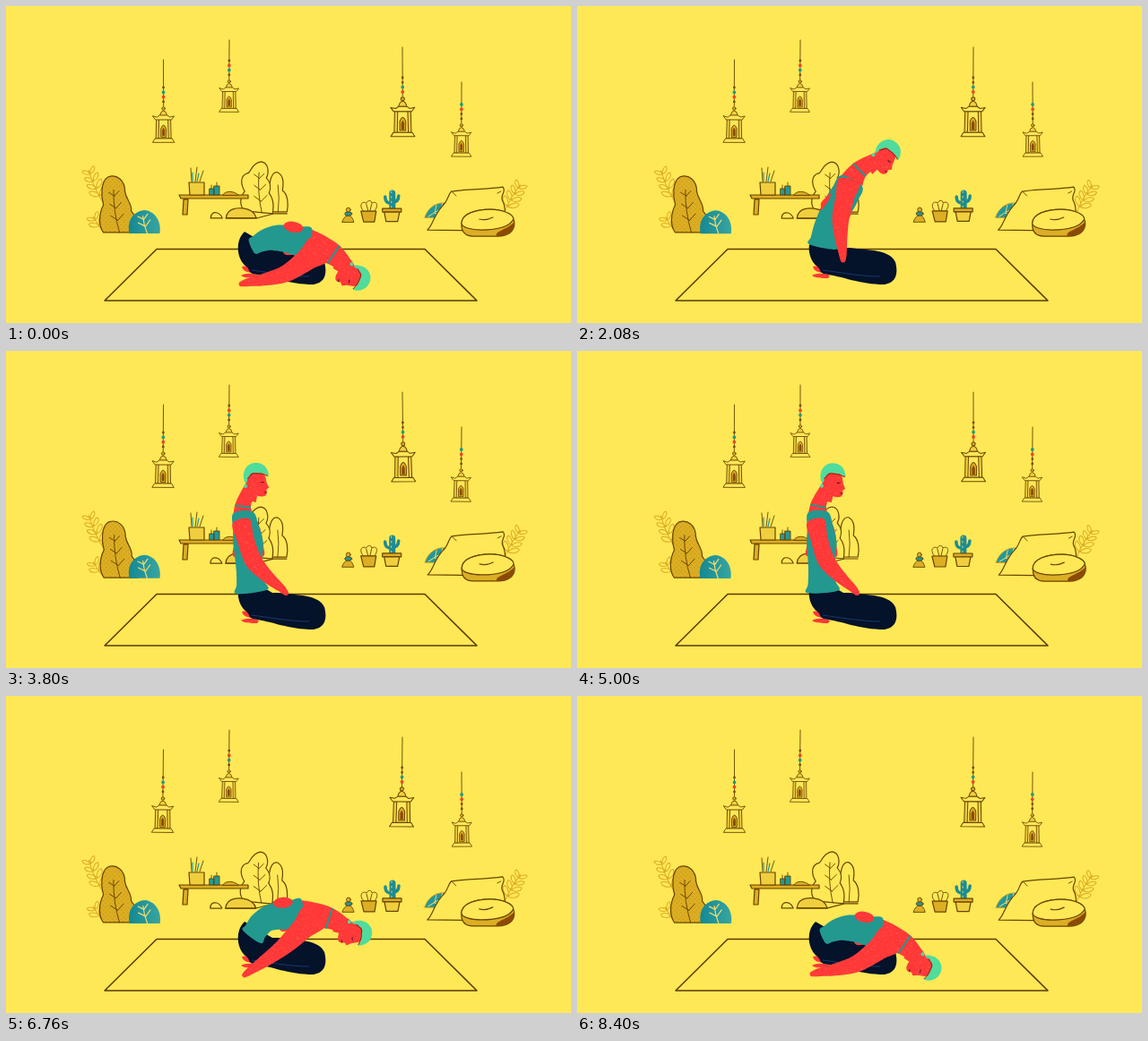
Write an HTML page that moves like this. It is 630 px wide and 354 px high and loops after 8480 ms.

```html
<!DOCTYPE html>
<html lang="en">
<head>
<meta charset="utf-8">
<title>Yoga room</title>
<style>
  html, body { margin: 0; width: 100%; height: 100%; overflow: hidden; background: #ffe856; }
  svg { display: block; width: 100vw; height: 100vh; }
  .line { fill: none; stroke: #684400; stroke-width: 1.2; stroke-linecap: round; stroke-linejoin: round; }
  .mat { stroke: #5a3a00; stroke-width: 1.5; }
  .paper { fill: #ffe856; }
  .gold { fill: #dcae24; }
  .light { fill: #f0cf3e; }
  .dark { fill: #8c4a04; stroke: none; }
  .teal { fill: #23989a; }
  .thin { stroke-width: .9; }
  .fern { stroke: #dcab22; stroke-width: 1; }
  .vein { stroke: #f2dc72; }
  .plain { stroke: none; }
  .skin { fill: #ff3838; }
  .grain { fill: url(#grain); }
  .top { fill: #23988f; }
</style>
</head>
<body>
<svg viewBox="0 0 630 354" preserveAspectRatio="xMidYMid meet">
  <defs>
    <pattern id="speckGold" width="5" height="5" patternUnits="userSpaceOnUse">
      <rect width="5" height="5" fill="#dcae22"/>
      <path d="M1 1h1v1h-1zM3.5 3.5h1v1h-1z" fill="#b98a14"/>
    </pattern>
    <pattern id="grain" width="40" height="40" patternUnits="userSpaceOnUse"></pattern>
    <linearGradient id="bush">
      <stop offset="0" stop-color="#148894"/>
      <stop offset="1" stop-color="#38a5a0"/>
    </linearGradient>
  </defs>

  <g class="line">
    <path class="mat" d="M168 271.5H467L525 329H110Z"/>

    <g id="ferns" class="fern boil" data-amp="1"></g>

    <g class="boil" data-amp=".6">
      <path fill="url(#speckGold)" d="M109 253C103 245 104 232 109 222C106 212 106 196 114 191C124 187 133 195 133 207C134 216 141 220 140 229C146 236 149 245 147 253Z"/>
      <g class="thin" data-veins="127 253 48 -8 3"></g>
    </g>
    <g class="boil" data-amp=".6">
      <path class="plain" fill="url(#bush)" d="M138 254C135 239 143 229 155 228C167 229 174 241 172 254Z"/>
      <g class="vein" data-veins="158 254 20 -14 2"></g>
    </g>

    <g class="boil" data-amp=".3">
      <path class="paper" d="M295 230C291 208 293 183 303 186C310 190 309 199 308 206C314 210 315 222 313 230Z"/>
      <path class="paper" d="M266 229C259 222 261 213 266 207C261 199 261 190 268 187C273 188 272 176 284 174C293 175 293 187 290 192C297 200 294 206 293 209C299 217 298 225 297 232Z"/>
      <g class="thin" data-veins="285 231 45 -4 3"></g>
      <path class="thin" d="M303 200Q305 215 303 230"/>
      <path class="light" d="M245 237C246 227 254 225 264 226C272 227 277 230 279 237Z"/>
      <path class="paper" d="M228 237C228 232 231 230 235 231C239 232 240 235 241 237Z"/>
      <path d="M245 237H279L298 232H313"/>
    </g>
    <g>
      <path class="gold" d="M198 216L197 233H202L203 216ZM193 211H270V215H195Z"/>
      <path class="light" d="M204 197H221V211H205Z"/>
      <path class="thin" d="M207 196L206 181M211 196L213 180M216 196L220 184"/>
      <path stroke="#23989a" d="M208 196V186M213 196L215 187"/>
      <path class="teal thin" d="M227 204H232V211H227ZM232 201H238V211H232Z"/>
      <path class="thin" d="M229 204V200M235 201V197"/>
      <path class="gold thin" d="M242 211C244 206 254 206 259 211Z"/>
    </g>

    <g class="boil" data-amp=".3">
      <path class="gold thin" d="M375 241C377 235 380 234 382 234C385 234 387 237 388 241Z"/>
      <ellipse class="teal thin" cx="382" cy="232" rx="4" ry="2.3"/>
      <circle class="gold thin" cx="382" cy="227.500" r="2.400"/>
      <path class="paper thin" d="M399 229C393 223 397 217 402 220C404 216 408 217 408 220C414 217 416 223 411 229Z"/>
      <path class="thin" d="M402 221L404 229M408 221L406 229"/>
      <path class="gold" d="M396 229H413L411 241H399Z"/>
      <g fill="none" stroke="#1d8c92">
        <path stroke-width="7" d="M431 225V209"/>
        <path stroke-width="3.500" d="M431 220Q423 221 423 213M431 219Q438 219 438 212"/>
      </g>
      <path class="vein thin" stroke-dasharray="1.500 4" d="M430 207V225"/>
      <path class="gold" d="M420 226H441V230H420Z"/>
      <path class="light" d="M422 230H439L437 240.500H424Z"/>
    </g>

    <g class="boil" data-amp=".3">
      <path class="teal thin" stroke="#c99620" d="M467 236C471 224 482 217 495 221L490 236Z"/>
      <g class="vein thin" data-veins="471 235 20 62 2"></g>
      <path class="paper" d="M470 250C476 245 476 236 486 224C494 217 493 209 497 207C515 204 535 205 554 202C559 207 550 211 554 218C558 225 555 232 558 240L545 251Z"/>
      <path class="thin" d="M497 207L502 212M552 207L548 209"/>
      <path class="gold" d="M508 244C507 232 524 227 540 227C556 227 567 234 567 243C567 252 559 257 549 257H521C512 257 508 252 508 244Z"/>
      <path class="dark" d="M567 241C568 252 558 257 547 257C545 251 559 250 567 241Z"/>
      <path class="paper" d="M508 243C508 232 524 227 540 227C553 227 566 232 566 238C562 246 548 250 530 250C518 250 509 247 508 243Z"/>
      <path d="M528 238Q535 240 543 236"/>
    </g>
    <g id="lamps"></g>
  </g>

  <g id="figure">
    <path class="skin" d="M263 291C268 289 273 293 277 294L276 298C270 298 264 296 263 291ZM262 301C267 298 275 298 282 301L280 304C274 304 266 304 262 301Z"/>
    <path fill="#04122a" d="M266 252C255 262 257 283 268 291C272 294 270 297 275 299C297 302 315 311 343 311C357 309 358 297 355 286C351 277 341 275 331 273C318 272 311 270 297 270Z"/>
    <path fill="none" stroke="#17396c" d="M274 295C297 298 318 302 338 302"/>
    <path id="skin" class="skin"/>
    <path id="skinGrain" class="grain"/>
    <path id="top" class="top"/>
    <ellipse id="scoop" class="skin" rx="11"/>
    <path id="strap" fill="none" stroke="#23988f" stroke-width="2"/>
    <g id="head">
      <path class="skin" d="M-10-10C0-15 10-13 12-6L13 2 15 7 12 9 12 13C11 17 6 17 1 15L-1 22-12 18C-11 12-11 4-10-10Z"/>
      <path class="grain" d="M-10-10C0-15 10-13 12-6L13 2V9L1 15-1 22-12 18Z"/>
      <path fill="none" stroke="#5a1420" d="M6 0q2 1.200 4 0M9 12h3"/>
      <path fill="#4fdc9c" d="M-11-1C-15-12-8-22 1-22C10-22 16-16 16-6C10-11 6-10 0-11C-5-12-5-7-8-6C-8-2-10 2-11-1Z"/>
      <path fill="none" stroke="#8c2a14" d="M-8-5C-5-6-5-11 0-10.500C6-9.500 10-10 15-6"/>
      <circle cx="-11" cy="3" r="2" fill="#4fdc9c"/>
    </g>
    <path id="arm" class="skin"/>
    <path id="armGrain" class="grain"/>
  </g>
</svg>
<script>
const LOOP = 8480, MIRROR = 8040, BOIL = 80;
const LIFT_FROM = 200, RISE_FROM = 1280, UPRIGHT = 2720, TALL = 3900;
const RAD = Math.PI / 180;
const $ = id => document.getElementById(id);
const all = q => [...document.querySelectorAll(q)];

const clamp = u => Math.min(1, Math.max(0, u));
const mix = (a, b, u) => a + (b - a) * u;
const mixPoint = (p, q, u) => [mix(p[0], q[0], u), mix(p[1], q[1], u)];
const polar = ([x, y], deg, len) => [x + Math.cos(deg * RAD) * len, y + Math.sin(deg * RAD) * len];
const noise = (a, b) => {
  const s = Math.sin(a * 12.9898 + b * 78.233) * 43758.5453;
  return s - Math.floor(s);
};
const jitter = (a, b) => noise(a, b) * 2 - 1;

// Closed smooth curve through the points
function smooth(p) {
  const n = p.length, at = i => p[(i + n) % n], fix = v => v.toFixed(2);
  return `M${p[0].map(fix)}` + p.map((b, i) => {
    const a = at(i - 1), c = at(i + 1), e = at(i + 2);
    const c1 = b.map((v, k) => fix(v + (c[k] - a[k]) / 6));
    const c2 = c.map((v, k) => fix(v - (e[k] - b[k]) / 6));
    return `C${c1} ${c2} ${c.map(fix)}`;
  }).join('') + 'Z';
}

// A bent tube round a chain of joints; s counts joints along it
function limb(joints, widths) {
  const last = joints.length - 1;
  const joint = i => joints[Math.min(last, Math.max(0, i))];
  const at = s => {
    const i = Math.min(last - 1, Math.floor(s)), u = s - i;
    const [a, b, c, d] = [-1, 0, 1, 2].map(k => joint(i + k));
    return b.map((v, k) => v + u * (c[k] - a[k] + u * (2 * a[k] - 5 * v + 4 * c[k] - d[k]
      + u * (3 * (v - c[k]) + d[k] - a[k]))) / 2);
  };
  const angle = s => {
    const p = at(Math.max(0, s - .1)), q = at(Math.min(last, s + .1));
    return Math.atan2(q[1] - p[1], q[0] - p[0]) / RAD;
  };
  const side = (s, k) => {
    const i = Math.min(last - 1, Math.floor(s));
    return polar(at(s), angle(s) - 90, k * mix(widths[i], widths[i + 1], s - i));
  };
  const tube = (from, to) => {
    const steps = Array.from({ length: 7 }, (_, i) => mix(from, to, i / 6));
    return smooth([...steps.map(s => side(s, 1)), ...steps.reverse().map(s => side(s, -1))]);
  };
  return { angle, side, tube };
}

function pose(t) {
  const lift = clamp((t - LIFT_FROM) / (RISE_FROM - LIFT_FROM)) ** 2;
  const u = clamp((t - RISE_FROM) / (UPRIGHT - RISE_FROM));
  const rise = u * (.66 + 1.68 * u - 1.34 * u * u);
  const tall = Math.sin(clamp((t - UPRIGHT) / (TALL - UPRIGHT)) * Math.PI / 2);
  const blend = (fold, lifted, up) => mix(mix(fold, lifted, lift), up, rise);

  const lean = -5 * tall;
  const bones = [
    [26, blend(-22, -50, -92)],
    [34, blend(8, -8, -87)],
    [36, blend(22, 6, -94)],
    [30, blend(48, 30, -58)]
  ];
  const joints = [[274, 269]];
  for (const [len, deg] of bones) joints.push(polar(joints.at(-1), deg + lean, len));
  const spine = limb(joints, [blend(8, 12, 17), 14, 17, blend(12, 12, 9), 6]);

  const shoulder = spine.side(2.55, .3 * rise);
  const hand = [blend(260, 264, 314), blend(311, 313, 272)];
  const reach = Math.atan2(hand[1] - shoulder[1], hand[0] - shoulder[0]) / RAD;
  const elbow = polar(mixPoint(shoulder, hand, .47), reach + 90, blend(-10, -4, 12));
  const arm = limb([shoulder, elbow, mixPoint(elbow, hand, .8), hand],
    [blend(15, 15, 9.5), 9.5, 4.5, 1.5]);
  return { spine, arm, rise, headAt: joints[4], headTurn: bones[3][1] + lean + 58 };
}

function drawFigure(t) {
  const { spine, arm, rise, headAt, headTurn } = pose(t);
  const set = (id, name, value) => $(id).setAttribute(name, value);
  const grained = (id, d) => [id, id + 'Grain'].forEach(key => set(key, 'd', d));
  grained('skin', spine.tube(1.4, 3.8));
  grained('arm', arm.tube(0, 3));
  set('top', 'd', spine.tube(0, mix(2.15, 2.8, rise)));
  set('strap', 'd', `M${spine.side(3, 1)}L${spine.side(3, -1)}`);
  set('scoop', 'ry', 6 * (1 - rise));
  set('scoop', 'transform', `translate(${spine.side(1.6, .9)}) rotate(${spine.angle(1.6)})`);
  set('head', 'transform', `translate(${headAt}) rotate(${headTurn})`);
}

// A stem with pairs of parts growing from it
function sprig(x, y, len, lean, pairs, part) {
  let d = `M0 0Q${-len * .08} ${-len / 2} 0 ${-len}`;
  for (let i = 1; i <= pairs; i++)
    for (const k of [-1, 1]) d += `M0 ${-len * i / (pairs + .5)}` + part(k, 1.15 - i / pairs * .35);
  return `<path transform="translate(${x} ${y}) rotate(${lean})" d="${d}"/>`;
}
const leaf = (k, s) => `c${k * s} ${-6 * s} ${k * 7 * s} ${-9 * s} ${k * 9 * s} ${-8 * s}`
  + `c${k * s} ${4 * s} ${-k * 4 * s} ${8 * s} ${-k * 9 * s} ${8 * s}`;
const twig = (k, s) => `l${k * 7 * s} ${-6 * s}`;

$('ferns').innerHTML = sprig(109, 220, 40, -24, 4, leaf) + sprig(109, 252, 20, -34, 2, leaf)
  + sprig(556, 231, 36, 30, 4, leaf);
all('[data-veins]').forEach(g => g.innerHTML = sprig(...g.dataset.veins.split(' ').map(Number), twig));

const BEAD = { b: '#7a4a08', t: '#1d9c86', r: '#f04428' };
const lamps = [
  [175.5, 60, 112, 1, 'btrb'], [249, 38, 82, .9, 'brtb'],
  [442, 46, 101, 1.12, 'bbtr'], [508, 85, 131, .92, 'trbb']
];
$('lamps').innerHTML = lamps.map(([x, top, y, size, beads]) => `
  <g class="lamp" data-x="${x}" data-y="${top}">
    <path class="thin" d="M${x} ${top}V${y}"/>
    ${[...beads].map((c, i) => `<circle class="plain" cx="${x}" cy="${y - 21 + i * 5.3}" r="${c === 'b' ? 1.4 : 1.9}" fill="${BEAD[c]}"/>`).join('')}
    <g class="thin" transform="translate(${x} ${y}) scale(${size})">
      <circle class="gold" cx="0" cy="2.500" r="1.800"/>
      <path class="light" d="M-4 10Q-3 5 0 5Q3 5 4 10Z"/>
      <path class="light" d="M-8 15L-8.500 36H8.500L8 15Z"/>
      <path class="paper" d="M-5 15L-5.500 36H5.500L5 15Z"/>
      <path class="paper" d="M-12 11L-9 15H9L12 11 7 12 4 10H-4L-7 12Z"/>
      <path class="gold" d="M-3 34V25Q0 17 3 25V34Z"/>
      <path class="dark" d="M-1.500 33V27Q0 21 1.500 27V33Z"/>
      <path class="paper" d="M-12 40L-9.500 36H9.500L12 40Z"/>
    </g>
  </g>`).join('');

$('grain').innerHTML = Array.from({ length: 90 }, (_, i) =>
  `<circle cx="${noise(i, 1) * 40}" cy="${noise(i, 2) * 40}" r=".5" fill="#ff8a72" opacity=".5"/>`).join('');

const boils = all('.boil'), hung = all('.lamp');
let lastStep = -1;

// Hand-drawn wobble, renewed at each step
function boil(k) {
  if (k === lastStep) return;
  lastStep = k;
  boils.forEach((g, i) => {
    const a = +g.dataset.amp;
    g.setAttribute('transform', `translate(${jitter(k, i + 3) * a} ${jitter(k, i + 23) * a * .4})`);
  });
  hung.forEach((g, i) =>
    g.setAttribute('transform', `rotate(${jitter(k, i + 43) * .7} ${g.dataset.x} ${g.dataset.y})`));
  $('grain').setAttribute('patternTransform', `translate(${noise(k, 61) * 40} ${noise(k, 62) * 40})`);
}

const start = performance.now();
function frame() {
  const time = (performance.now() - start) % LOOP;
  drawFigure(Math.min(time, MIRROR - time));
  boil(Math.floor(time / BOIL));
  requestAnimationFrame(frame);
}
frame();
</script>
</body>
</html>
```
